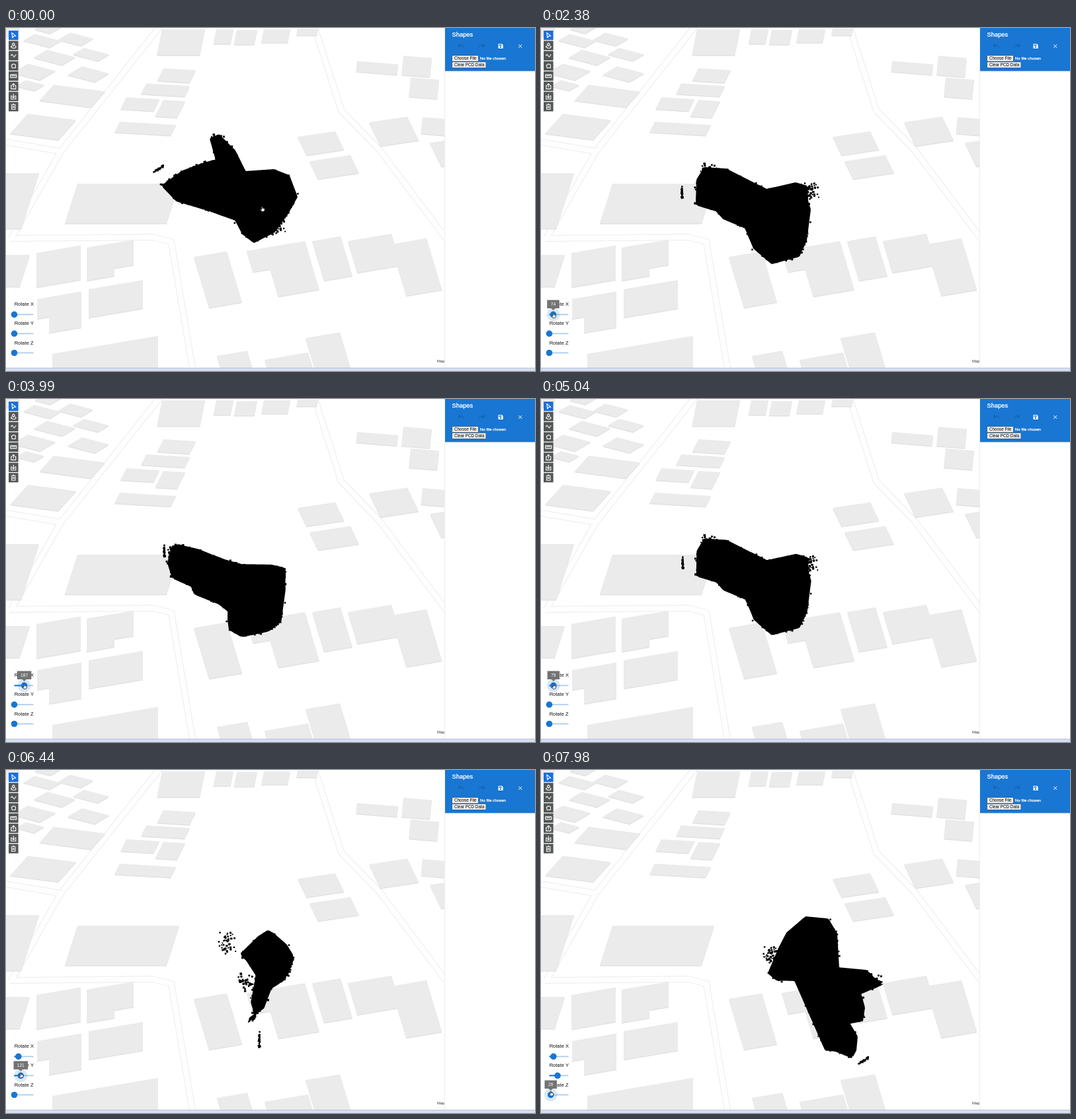
An HTML page with a canvas that plays this animation: 800x520 px, repeating every 8 s.

```html
<!DOCTYPE html>
<html lang="en">
<head>
<meta charset="utf-8">
<title>Point cloud rotation</title>
<style>
html, body { margin: 0; width: 100%; height: 100%; overflow: hidden; background: #fff; }
canvas { display: block; width: 800px; height: 520px; }
</style>
</head>
<body>
<canvas id="stage" width="800" height="520"></canvas>
<script>
const LOOP = 8000;
const BLUE = '#1976d2';
const FONT = '"Liberation Sans", Arial, sans-serif';
const stage = document.getElementById('stage');
let g = stage.getContext('2d');

const lerp = (a, b, k) => a + (b - a) * k;
const pairs = s => s.trim().split(/\s+/).map(p => p.split(',').map(Number));

// Piecewise linear value; keys are [position, value].
function track(t, keys) {
  if (t <= keys[0][0]) return keys[0][1];
  for (let i = 1; i < keys.length; i++) {
    const [t0, a] = keys[i - 1], [t1, b] = keys[i];
    if (t < t1) return lerp(a, b, (t - t0) / (t1 - t0));
  }
  return keys[keys.length - 1][1];
}

function seeded(seed) {
  return () => (seed = (seed * 16807) % 2147483647) / 2147483647;
}

function trace(pts, close = true) {
  g.beginPath();
  pts.forEach(([x, y], i) => i ? g.lineTo(x, y) : g.moveTo(x, y));
  if (close) g.closePath();
}

function shape(pts, color) {
  trace(pts);
  g.fillStyle = color;
  g.fill();
}

function line(pts, color, width) {
  trace(pts, false);
  g.strokeStyle = color;
  g.lineWidth = width;
  g.stroke();
}

function rect(x, y, w, h, color) {
  g.fillStyle = color;
  g.fillRect(x, y, w, h);
}

function disc(x, y, r, color) {
  g.beginPath();
  g.arc(x, y, r, 0, 7);
  g.fillStyle = color;
  g.fill();
}

function label(s, x, y, size, color, weight = 0, align = 'left') {
  g.font = size + 'px ' + FONT;
  g.textAlign = align;
  g.fillStyle = color;
  g.fillText(s, x, y);
  if (weight) {
    g.strokeStyle = color;
    g.lineWidth = weight;
    g.strokeText(s, x, y);
  }
}

// ---- Map ----
const roads = [
  '234,-4 83,187 8,319',
  '0,173 83,187',
  '6,319 222,317 250,324 282,516',
  '466,-4 507,125 565,185 666,320'
].map(pairs);

// Blocks in a district share the slope of the street edge and the lean of
// the side edge. Each lot is "x,y,width,depth" from its upper left corner.
const districts = [
  { slope: 0.26, lean: -1.7, lots: '2,-4,20,12 60,-8,24,10 43,9,40,10 97,7,35,11 118,30,38,10 62,33,43,12 115,58,41,13 33,54,42,14 30,79,28,9' },
  { slope: 0.13, lean: -0.9, lots: '72,86,78,24 33,130,73,30' },
  { slope: 0.06, lean: -0.5, lots: '238,61,49,19 212,84,66,16 182,105,50,18 238,109,33,25 172,142,85,16' },
  { slope: 0, lean: -0.2, lots: '236,2,65,39 318,2,26,22 349,3,31,22 390,2,40,20 441,1,31,10' },
  { slope: 0.08, lean: -0.1, lots: '531,50,62,16 601,42,43,29 612,75,43,29 630,135,36,25' },
  { slope: -0.15, lean: 0.48, lots: '441,165,57,28 459,202,62,27 549,143,58,36 641,174,40,36' },
  { slope: -0.17, lean: 0.3, lots: '284,347,50,77 364,338,88,32 390,334,62,73 463,323,43,60 517,323,66,48 582,328,54,78 319,497,46,30 391,503,66,25 453,470,52,60' },
  { slope: -0.17, lean: 0, lots: '46,341,67,52 122,333,42,50 122,333,71,38 47,411,67,30 65,408,49,54 125,396,82,43 70,494,160,60' },
  { slope: 0, lean: -0.32, lots: '108,236,154,60 0,220,50,84 0,344,36,48' }
];

function drawLots(dy, color) {
  for (const { slope, lean, lots } of districts) {
    for (const [x, y, w, d] of pairs(lots)) {
      const side = d * lean, drop = w * slope, top = y + dy;
      shape([[x, top], [x + w, top + drop], [x + w + side, top + drop + d], [x + side, top + d]], color);
    }
  }
}

function drawMap() {
  rect(0, 0, 800, 520, '#fff');
  g.lineJoin = 'round';
  for (const r of roads) line(r, '#ececec', 10);
  for (const r of roads) line(r, '#fefefe', 8);
  drawLots(1.5, '#e2e2e2');
  drawLots(0, '#ebebeb');
  label('Map', 652, 507, 6, '#333');
}

// ---- Toolbar and side panel ----
const tray = 'M-2-1H-3.5V4H3.5V-1H2M0 2V-4';
const toolIcons = [
  'M-2.5-4L3.5 1L.5 1.2L-1.5 3.8Z',
  'M0-4L2-2L0 1L-2-2ZM-2 0L-4 2L-1 4H2L4 2L2 0',
  'M-4 0L-2-2L1 2L4-2',
  'M-3-1L0-3L3-2V3H-2Z',
  'M-4.5-2H4.5V2H-4.5ZM-2-2V0M0-2V0M2-2V0',
  tray + 'M-2-2L0-4L2-2',
  tray + 'M-2 0L0 2L2 0',
  'M-3.5-3H3.5M-1-4H1M-2.7-2V4H2.7V-2M-.8-1V2M.8-1V2'
];

function drawToolbar() {
  toolIcons.forEach((icon, i) => {
    const y = 4 + i * 15.45;
    rect(4, y, 14.6, 14.2, i ? '#535755' : '#1a6fdb');
    g.save();
    g.translate(11.3, y + 7.1);
    g.strokeStyle = '#fff';
    g.lineWidth = 1.1;
    g.stroke(new Path2D(icon));
    g.restore();
  });
}

function button(s, y, w) {
  rect(674.5, y, w, 9.2, '#555');
  rect(675, y + 0.5, w - 1, 8.2, '#efefef');
  label(s, 678, y + 6.9, 6.3, '#000');
}

function arrowIcon(x, dir) {
  line([[x - 4 * dir, 27], [x, 25.5], [x + 4 * dir, 29]], '#145ca6', 1);
  line([[x - 4 * dir, 24], [x - 4 * dir, 28], [x - dir, 28]], '#145ca6', 1);
}

function drawPanel() {
  rect(663, 0, 137, 515, '#ececec');
  rect(664, 0, 136, 515, '#fff');
  rect(664, 65, 136, 1, '#c9d5e2');
  rect(664, 66, 136, 1, '#eef1f5');
  rect(664, 0, 136, 65, BLUE);
  label('Shapes', 674.6, 13, 9.3, '#fff', 0.3);
  arrowIcon(689, 1);
  arrowIcon(719, -1);
  shape(pairs('744.5,24 750,24 751.7,25.7 751.7,31 744.5,31'), '#fff');
  rect(745.5, 25, 4, 1.7, BLUE);
  disc(748, 28.8, 1.2, BLUE);
  line([[775.2, 25], [780.2, 30]], '#fff', 1);
  line([[780.2, 25], [775.2, 30]], '#fff', 1);
  button('Choose File', 41.5, 40);
  label('No file chosen', 716.8, 48.2, 6.2, '#fff', 0.25);
  button('Clear PCD Data', 51.3, 51.5);
  rect(0, 515, 800, 5, '#d5def2');
  rect(0, 515, 800, 1, '#b9c1d2');
}

// ---- Point cloud ----
const EDGE = 240;
const rnd = seeded(77);
const jitter = r => (rnd() + rnd() - 1) * r;
const many = (n, make) => Array.from({ length: n }, make);

// Loose points belong to the rim, the detached stick, the spray or the tuft.
const specks = [
  ...many(70, () => ({ at: 'rim', i: Math.floor(rnd() * EDGE), dx: jitter(3), dy: jitter(3) })),
  ...many(22, () => ({ at: 'stick', along: rnd() * 22 - 11, dx: jitter(1.3), dy: jitter(1.3) })),
  ...many(40, () => ({ at: 'spray', dx: jitter(15), dy: jitter(18) })),
  ...many(40, () => ({ at: 'tuft', dx: jitter(13), dy: jitter(11) }))
];
const sizes = specks.map(() => 1.8 + rnd() * 1.6);

function resample(pts, n) {
  const ends = [];
  let total = 0;
  pts.forEach(([x, y], i) => {
    const [nx, ny] = pts[(i + 1) % pts.length];
    ends.push(total += Math.hypot(nx - x, ny - y));
  });
  return many(n, (_, k) => {
    const d = k * total / n;
    const i = ends.findIndex(e => e > d);
    const start = i ? ends[i - 1] : 0;
    const a = pts[i], b = pts[(i + 1) % pts.length];
    const f = (d - start) / (ends[i] - start);
    return [lerp(a[0], b[0], f), lerp(a[1], b[1], f)];
  });
}

// A pose is one list of points: the rim, then every speck.
function makePose(corners, parts) {
  const rim = resample(corners, EDGE);
  return rim.concat(specks.map(s => {
    const [x, y, angle] = s.at === 'rim' ? rim[s.i] : parts[s.at];
    const along = s.along || 0;
    return [
      x + s.dx + along * Math.cos(angle || 0),
      y + s.dy + along * Math.sin(angle || 0)
    ];
  }));
}

// Corners run clockwise from the narrow end of the scan.
const flat = makePose(pairs(`236,239 267,217 296,206 318,200 309,168 322,162 346,186
  362,218 405,215 428,224 440,256 426,281 406,309 375,325 358,312 347,291 308,277 258,262`),
  { stick: [230, 214, -0.6], spray: [411, 299], tuft: [321, 171] });

const tilted = makePose(pairs(`235,268 236,230 247,212 280,214 341,245 385,235 402,240
  403,262 407,275 401,322 390,346 349,357 322,334 309,303 276,289 265,277`),
  { stick: [213, 249, 1.57], spray: [409, 247], tuft: [254, 215] });

const sideCorners = pairs(`262,273 251,252 258,226 268,227 320,245 340,251 403,261 432,266
  434,274 424,346 406,354 362,362 340,352 348,322 292,300 290,288`);
const sideParts = { stick: [255, 219, 1.57], spray: [342, 353], tuft: [256, 246] };
const side = makePose(sideCorners, sideParts);

// A quarter turn about Y shows the side view upside down, a little closer.
const flip = ([x, y, angle]) => [352 + (x - 350) * 1.1, 613 - y, angle];
const [tip, ...others] = sideCorners.map(flip);
const flipped = makePose([tip, ...others.reverse()],
  Object.fromEntries(Object.entries(sideParts).map(([k, p]) => [k, flip(p)])));

const turned = makePose(pairs(`520,376 482,374 430,334 393,313 365,320 349,314 347,270
  352,228 361,219 394,211 412,219 440,252 494,243 510,252 493,268 512,303 496,320 518,333 523,345`),
  { stick: [542, 362, 1.65], spray: [338, 283], tuft: [502, 254] });

const spun = makePose(pairs(`470,436 446,426 430,424 384,319 356,318 344,308 360,270 372,247
  400,223 434,226 447,248 450,300 492,304 514,326 483,339 489,360 486,380 466,384 478,404 476,425`),
  { stick: [487, 441, -0.6], spray: [348, 280], tuft: [506, 319] });

const mix = (a, b, k) => a.map(([x, y], i) => [lerp(x, b[i][0], k), lerp(y, b[i][1], k)]);

// The far end swings outwards halfway through a turn.
const swing = (pose, k) => pose.map(([x, y]) => [
  x + (x - 390) * k * (1 - k) * 0.5,
  y + (y - 295) * k * (1 - k) * 1.4
]);

function cloudPose(x, y, z) {
  let pose = x < 74 ? mix(flat, tilted, x / 74)
    : mix(tilted, side, Math.min(1, (x - 74) / 181));
  if (y > 74) {
    const k = Math.min(1, (y - 74) / 102);
    pose = swing(mix(flipped, turned, k), k);
  } else if (y > 0) {
    pose = mix(pose, flipped, y / 74);
  }
  return z > 0 ? mix(pose, spun, z / 28) : pose;
}

function drawCloud(values) {
  const pose = cloudPose(...values);
  const rim = pose.slice(0, EDGE);
  shape(rim, '#000');
  line(rim, '#000', 2);
  pose.slice(EDGE).forEach(([x, y], i) => {
    const s = sizes[i];
    rect(x - s / 2, y - s / 2, s, s, '#000');
  });
}

// ---- Sliders ----
const sliders = [
  { name: 'X', y: 434.4, shown: [1850, 5120],
    keys: [[2010, 0], [2380, 74], [3290, 255], [3450, 262], [4200, 158], [4480, 158], [4950, 79]] },
  { name: 'Y', y: 463.3, shown: [5450, 7520],
    keys: [[5600, 0], [6020, 74], [6930, 176], [7100, 180], [7450, 155]] },
  { name: 'Z', y: 492.5, shown: [7700, LOOP], keys: [[7800, 0], [7980, 28]] }
];
const thumbX = value => 12.5 + value / 360 * 29;

function drawSliders(t, values) {
  rect(8, 409, 38, 94, '#fff');
  for (const s of sliders) label('Rotate ' + s.name, 12.7, s.y - 13, 7.5, '#111');
  sliders.forEach(({ y, shown }, i) => {
    const x = thumbX(values[i]);
    rect(12.5, y - 0.8, 29, 1.6, '#a6c7ec');
    rect(12.5, y - 1, x - 12.5, 2, BLUE);
    const on = t >= shown[0] && t < shown[1];
    if (on) disc(x, y, 10, 'rgba(25,118,210,.17)');
    disc(x, y, 4.8, BLUE);
    if (!on) return;
    const text = String(Math.round(values[i]));
    const w = text.length > 2 ? 21.5 : 18.5;
    const top = y - 22;
    rect(x - w / 2, top, w, 12.6, '#737373');
    shape([[x - 3, top + 12.5], [x + 3, top + 12.5], [x, top + 15.5]], '#737373');
    label(text, x, top + 8.7, 6.6, '#fff', 0, 'center');
  });
}

// ---- Pointer ----
function drawPointer(t, values) {
  const [x, y, z] = values.map(v => thumbX(v) + 0.7);
  const px = track(t, [[700, 388], [1900, x], [5120, x], [5500, y], [7500, y], [7750, z]]);
  const py = track(t, [[700, 274.5], [1900, 436], [5120, 436], [5500, 463], [7500, 463], [7750, 490.5]]);
  const hand = new Path2D('M-1.3-3.4H-.1L.1-1.2L2-1L3.2 0L3 2L2 3.6H-1.4L-3.2 1L-2.7.1L-1.3 1.1Z');
  g.save();
  g.translate(px, py);
  g.fillStyle = '#fff';
  g.fill(hand);
  g.strokeStyle = '#222';
  g.lineWidth = 0.8;
  g.stroke(hand);
  g.restore();
}

// The map and panels never change, so they are painted once.
function layer(paint) {
  const c = document.createElement('canvas');
  c.width = 800;
  c.height = 520;
  const main = g;
  g = c.getContext('2d');
  paint();
  g = main;
  return c;
}
const backdrop = layer(() => { drawMap(); drawToolbar(); drawPanel(); });

const began = performance.now();
function frame() {
  const t = (performance.now() - began) % LOOP;
  const values = sliders.map(s => track(t, s.keys));
  g.drawImage(backdrop, 0, 0);
  drawCloud(values);
  drawSliders(t, values);
  drawPointer(t, values);
  requestAnimationFrame(frame);
}
frame();
</script>
</body>
</html>
```
